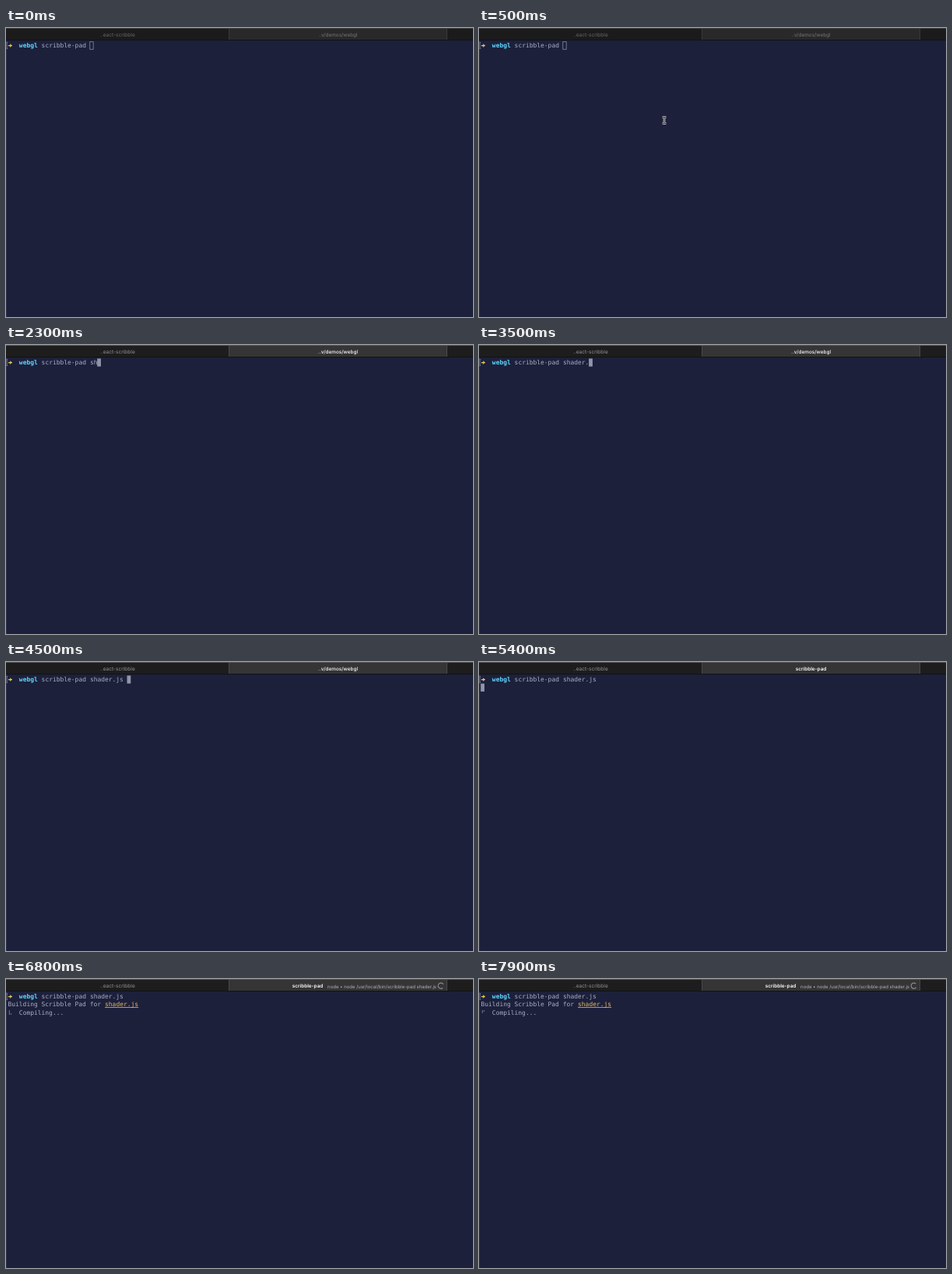
An HTML page with a canvas that plays this animation: 600 by 371 pixels, repeating every 8000 ms.

```html
<!DOCTYPE html>
<html lang="en">
<head>
<meta charset="utf-8">
<title>Terminal</title>
<style>
html, body { margin: 0; width: 100%; height: 100%; overflow: hidden; background: #1c203b; }
canvas { display: block; width: 600px; height: 371px; }
</style>
</head>
<body>
<canvas id="stage" width="600" height="371"></canvas>
<script>
const ctx = document.getElementById('stage').getContext('2d');
const LOOP = 8000, STEP = 100;
const COL = 4.79, ROW = 10.3, LEFT = 2.5, BASE = 25;
const MONO = '7.95px "DejaVu Sans Mono", monospace';
const UI = 'Inter, sans-serif';
const INK = '#abadc4', GOLD = '#ecb65c';

// When each piece of the command line appears
const TYPED = [[2000, 's'], [2200, 'sh'], [2400, 'sha'], [2900, 'shader.'],
               [3800, 'shader.j'], [4200, 'shader.js ']];
const FOCUS = 600, POINTER_ON = 400, POINTER_OFF = 1900;
const ENTER = 4900, TITLE = 5200, PROCESS = 5700, BUILD = 6230;

// Lit braille dots (1-6) for each spinner position
const DOTS = ['124', '145', '1456', '456', '3456', '356', '2356', '1236', '123', '1234'];

function rect(x, y, w, h, color) {
  ctx.fillStyle = color;
  ctx.fillRect(x, y, w, h);
}

function text(str, x, y, font, color, align = 'left') {
  ctx.font = font;
  ctx.fillStyle = color;
  ctx.textAlign = align;
  ctx.fillText(str, x, y);
}

const colX = col => LEFT + col * COL;
const term = (str, col, row, color = INK, weight = '') =>
  text(str, colX(col), BASE + row * ROW, weight + MONO, color);

function tabs(t) {
  const on = t >= FOCUS;
  rect(0, 0, 600, 16, on ? '#1d1d1d' : '#1b1b1b');
  rect(287, 0, 280, 16, on ? '#353535' : '#292929');
  rect(0, 0, 600, 1, on ? '#555' : '#404040');
  rect(286, 1, 1, 15, on ? '#484848' : '#383838');
  rect(566, 1, 1, 15, on ? '#484848' : '#383838');
  rect(0, 15, 600, 1, '#111218');

  text('..eact-scribble', 143.3, 11.4, '6.55px ' + UI, on ? '#949494' : '#686868', 'center');
  if (t < TITLE) {
    text('..v/demos/webgl', 426.5, 11.4, (on ? '500 ' : '') + '6.4px ' + UI,
         on ? '#fff' : '#787878', 'center');
  } else if (t < PROCESS) {
    text('scribble-pad', 426.5, 11.4, '600 6.4px ' + UI, '#fff', 'center');
  } else {
    const built = t >= BUILD;
    const command = 'node /usr/local/bin/scribble-pad shader.js';
    text('scribble-pad', built ? 407.3 : 428.3, 11.4, '600 6.4px ' + UI, '#fff', 'right');
    text((built ? 'node • ' : '') + command, 553, 12, '6px ' + UI, '#b4b4b4', 'right');
    busy(t);
  }
}

function busy(t) {
  const turn = t / 560 * Math.PI * 2;
  ctx.strokeStyle = '#8e8e8e';
  ctx.lineWidth = 1.2;
  ctx.beginPath();
  ctx.arc(558.8, 8.7, 3.6, turn, turn + 4.8);
  ctx.stroke();
}

function prompt() {
  rect(0.7, 18, 0.9, 9, '#777a8e');
  rect(0.7, 18, 1.6, 0.7, '#777a8e');
  rect(0.7, 26.3, 1.6, 0.7, '#777a8e');
  ctx.fillStyle = '#e2c957';
  ctx.fill(new Path2D('M3 21.9H5.4L4.9 20.2L8.2 22.6L4.9 25L5.4 23.3H3Z'));
  term('webgl', 3, 0, '#5fd6fd', 'bold ');
  term('scribble-pad', 9, 0);
}

function caret(col, row, solid) {
  const x = colX(col) - 0.3, y = 17.4 + row * ROW;
  if (solid) return rect(x, y, COL, 10.2, '#9294aa');
  ctx.strokeStyle = '#8a8ca2';
  ctx.lineWidth = 0.8;
  ctx.strokeRect(x + 0.2, y + 0.3, COL - 0.4, 9.6);
}

function spinner(t) {
  const i = Math.floor((t - BUILD) / 80) % DOTS.length;
  for (const d of DOTS[i]) {
    const x = d > 3 ? 1 : 0, y = (d - 1) % 3;
    rect(3.8 + x * 2.1, 40.4 + y * 2, 1.1, 1.1, INK);
  }
}

function output(t) {
  term('Building Scribble Pad for', 0, 1);
  term('shader.js', 26, 1, GOLD);
  rect(colX(26), 36.2, 9 * COL, 0.8, GOLD);
  spinner(t);
  term('Compiling...', 3, 2);
}

function pointer(t) {
  const k = Math.min(1, (t - POINTER_ON) / 500);
  const y = 120 - 4 * k * (2 - k);
  const beam = new Path2D('M-2.4 -4H-1Q0 -4 0 -3V3Q0 4 -1 4H-2.4M2.4 -4H1Q0 -4 0 -3M0 3Q0 4 1 4H2.4');
  ctx.save();
  ctx.translate(238, y);
  ctx.lineWidth = 2.6;
  ctx.strokeStyle = '#d8d8de';
  ctx.stroke(beam);
  ctx.lineWidth = 0.9;
  ctx.strokeStyle = '#15161f';
  ctx.stroke(beam);
  ctx.restore();
}

function draw(t) {
  rect(0, 0, 600, 371, '#1c203b');
  rect(0, 16, 0.6, 355, '#3c4058');
  tabs(t);
  prompt();

  let typed = '';
  for (const [at, str] of TYPED) if (t >= at) typed = str;
  term(typed, 22, 0);

  if (t >= BUILD) output(t);
  else if (t >= ENTER) caret(0, 1, true);
  else caret(22 + typed.length, 0, t >= FOCUS);

  if (t >= POINTER_ON && t < POINTER_OFF) pointer(t);
}

ctx.textRendering = 'geometricPrecision';
const start = performance.now();
function frame() {
  const t = (performance.now() - start) % LOOP;
  draw(Math.floor(t / STEP) * STEP);
  requestAnimationFrame(frame);
}
frame();
</script>
</body>
</html>
```
